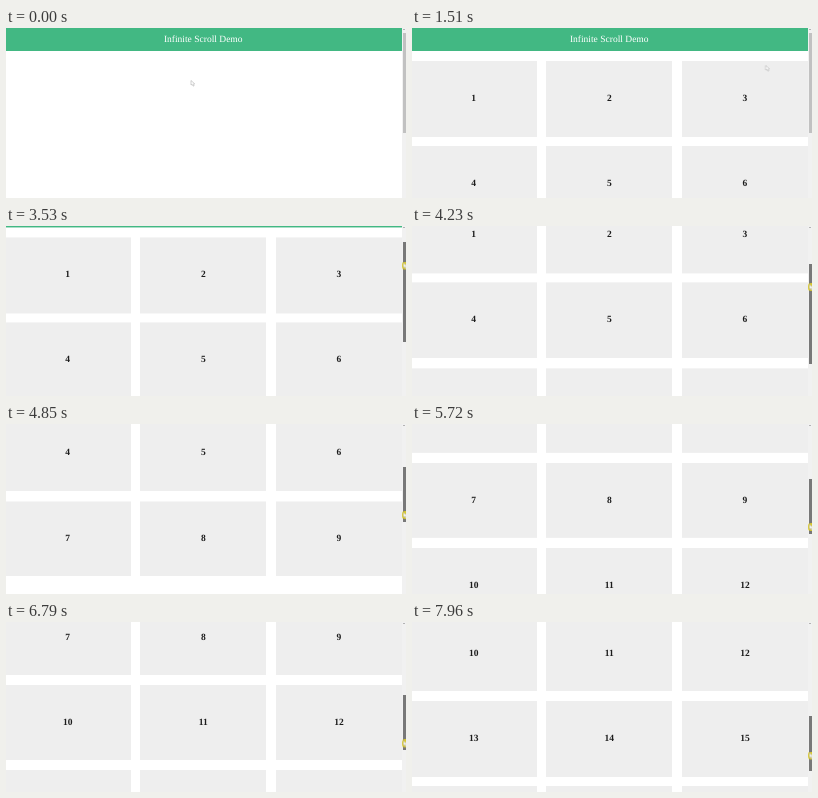
An HTML page for the animation above (8 s loop, 400 by 170 pixels).

```html
<!DOCTYPE html>
<html lang="en">
<head>
<meta charset="utf-8">
<title>Infinite Scroll Demo</title>
<style>
html, body { margin: 0; width: 100%; height: 100%; overflow: hidden; background: #fff; }
#stage { position: relative; width: 400px; height: 170px; overflow: hidden;
  font-family: "Liberation Serif", "Times New Roman", serif; text-rendering: geometricPrecision; }
#stage * { animation-duration: 8s; animation-timing-function: linear; animation-iteration-count: infinite; }

#page { position: absolute; inset: 0; animation-name: scroll; }
header { position: absolute; left: 0; top: 0; width: 394.4px; height: 23.4px; padding-right: 2px;
  background: #42b883; color: #fff; font-size: 9.5px; line-height: 24.6px; text-align: center; }
.card { position: absolute; width: 126px; height: 75.5px; background: #eee; color: #1c1c1c;
  font-size: 9.5px; font-weight: bold; line-height: 77px; text-align: center;
  animation-timing-function: step-end !important; }
.first { animation-name: load1; }
.more { animation-name: load2; }

#track { position: absolute; left: 396.4px; top: 0; width: 3.6px; height: 170px; background: #f1f1f1; }
#track::before { content: ""; position: absolute; left: .8px; top: 1.4px;
  border: solid transparent; border-width: 0 1.2px 1.6px; border-bottom-color: #777; }
#stage #thumb { position: absolute; left: .4px; right: 0; top: 5px; height: 100px; background: #c1c1c1;
  animation-name: drag, shrink, press; animation-timing-function: linear, step-end, step-end; }

#mouse { position: absolute; left: 0; top: 0; animation-name: move; }
#ring { position: absolute; left: -3px; top: -4px; width: 8px; height: 8px; border-radius: 50%;
  background: #dccb2c; animation-name: ring; animation-timing-function: step-end !important; }
#mouse svg { position: absolute; left: -2.5px; top: -3.5px; overflow: visible; }

@keyframes load1 { 0% { visibility: hidden } 6%, 100% { visibility: visible } }
@keyframes load2 { 0% { visibility: hidden } 62%, 100% { visibility: visible } }
@keyframes scroll {
  0%, 37.9% { transform: translateY(0) }
  44.125% { transform: translateY(-21.5px) }
  52.875% { transform: translateY(-61.5px) }
  59.375% { transform: translateY(-119px) }
  60.625% { transform: translateY(-126.5px) }
  78.375% { transform: translateY(-189.5px) }
  90.6%, 96.25% { transform: translateY(-258px) }
  99.5%, 100% { transform: translateY(-295px) }
}
@keyframes drag {
  0%, 37.9% { top: 5px }
  44.125% { top: 16px }
  52.875% { top: 38px }
  59.37% { top: 66px }
  59.38% { top: 41px }
  60.625% { top: 43px }
  78.375% { top: 62px }
  90.6%, 96.25% { top: 83px }
  99.5%, 100% { top: 94px }
}
@keyframes shrink { 0% { height: 100px } 59.375%, 100% { height: 55px } }
@keyframes press {
  0% { background: #c1c1c1 }
  37.9% { background: #787878 }
  91.6% { background: #a8a8a8 }
  93.5%, 100% { background: #787878 }
}
@keyframes move {
  0%, 2% { transform: translate(186px, 55px) }
  11% { transform: translate(352px, 44px) }
  18.875% { transform: translate(354.5px, 40px) }
  22% { transform: translate(386px, 30px) }
  32%, 37.9% { transform: translate(398.5px, 27px) }
  44.125% { transform: translate(398.5px, 39.5px) }
  52.875% { transform: translate(398.5px, 61px) }
  59.375% { transform: translate(398.5px, 89px) }
  60.625% { transform: translate(398.5px, 91px) }
  78.375% { transform: translate(398.5px, 110.5px) }
  90.6%, 91.6% { transform: translate(398.5px, 131px) }
  93.5%, 96.25% { transform: translate(398.5px, 123px) }
  99.5%, 100% { transform: translate(398.5px, 133.5px) }
}
@keyframes ring {
  0% { visibility: hidden }
  34.375% { visibility: visible }
  91.6% { visibility: hidden }
  93.5%, 100% { visibility: visible }
}
</style>
</head>
<body>
<div id="stage">
  <div id="page"><header>Infinite Scroll Demo</header></div>
  <div id="track"><div id="thumb"></div></div>
  <div id="mouse">
    <div id="ring"></div>
    <svg width="5" height="7"><path d="M1 .5V5L2.2 4.3 3 6H4L3.6 3.8H4.7Z" fill="#fff" stroke="#b4b4b4" stroke-width=".6"/></svg>
  </div>
</div>
<script>
const page = document.getElementById("page");
for (let i = 0; i < 18; i++) {
  const card = document.createElement("div");
  card.className = "card " + (i < 9 ? "first" : "more");
  card.style.left = -1.3 + 135.6 * (i % 3) + "px";
  card.style.top = 33.2 + 85.2 * Math.floor(i / 3) + "px";
  card.textContent = i + 1;
  page.append(card);
}
</script>
</body>
</html>
```
